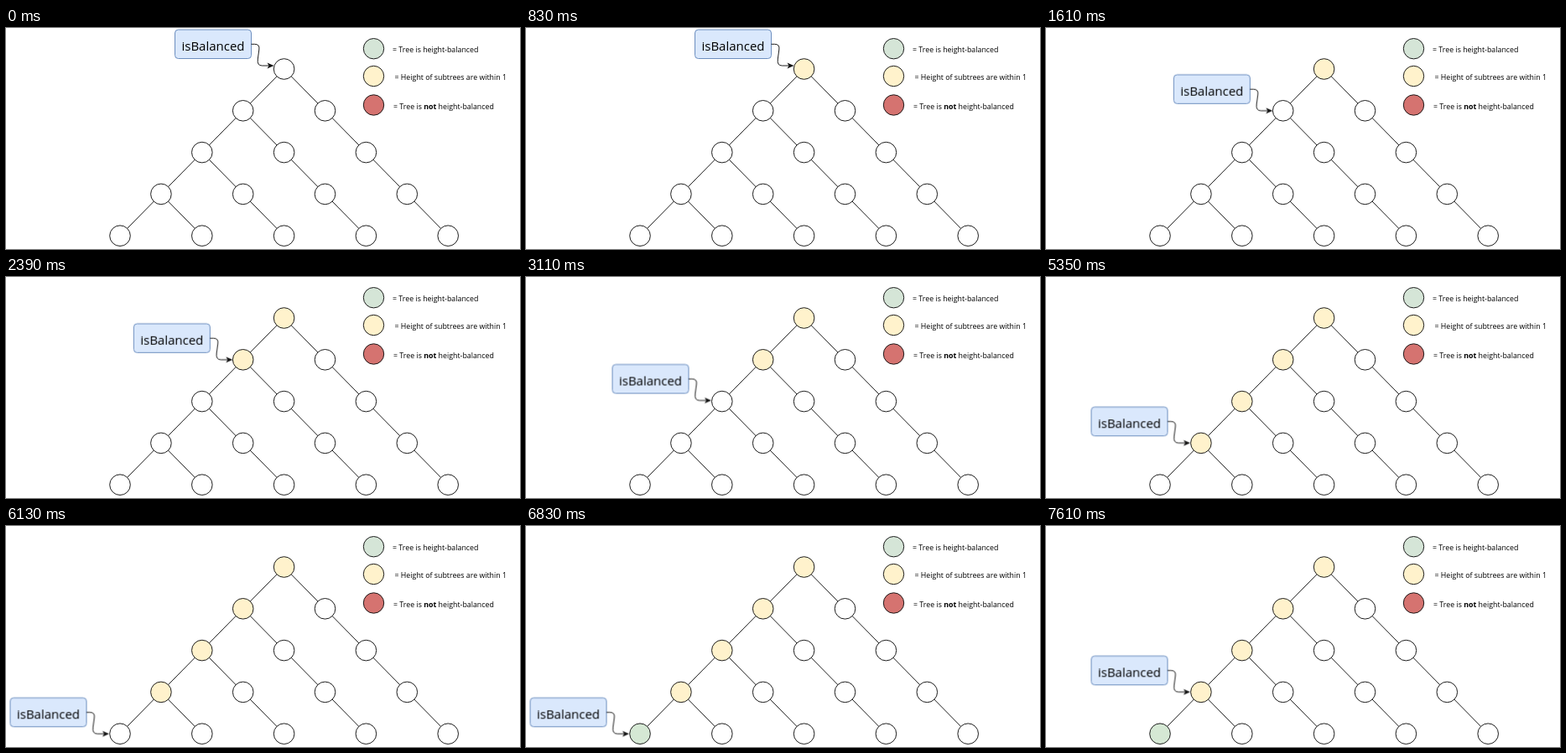
Animation, 613 px wide and 264 px high, one loop 8000 ms. Source, as an HTML page:

```html
<!DOCTYPE html>
<html lang="en">
<head>
<meta charset="utf-8">
<title>Balanced tree check</title>
<style>
  html, body { margin: 0; width: 100%; height: 100%; overflow: hidden; background: #fff; }
  svg { display: block; width: 613px; height: 264px; }
  text { font-family: "Open Sans", "Noto Sans", sans-serif; fill: #000; }
  circle, line, .arrow { stroke: #111; stroke-width: 0.95; }
  circle { fill: #fff; }
  .legend text { font-size: 8.83px; }
  .legend .bold { font-weight: 700; }
  .call { animation: walk 8s step-end infinite; }
  .call rect { fill: #dae8fc; stroke: #6c8ebf; }
  .call text { font-size: 15px; text-anchor: middle; }
  .arrow { fill: none; }
  .visit0 { animation: visit0 8s step-end infinite; }
  .visit1 { animation: visit1 8s step-end infinite; }
  .visit2 { animation: visit2 8s step-end infinite; }
  .visit3 { animation: visit3 8s step-end infinite; }
  .visit4 { animation: visit4 8s step-end infinite; }
  @keyframes walk {
    0%      { transform: translate(201.5px, 2px); }
    20.125% { transform: translate(152.3px, 55.8px); }
    38.875% { transform: translate(103px, 104.5px); }
    57.125% { transform: translate(54px, 155.3px); }
    76.625% { transform: translate(5px, 205.3px); }
    95.125%, 100% { transform: translate(54px, 155.3px); }
  }
  @keyframes visit0 { 0% { fill: #fff; } 10.375%, 100% { fill: #fff2cc; } }
  @keyframes visit1 { 0% { fill: #fff; } 29.875%, 100% { fill: #fff2cc; } }
  @keyframes visit2 { 0% { fill: #fff; } 48.375%, 100% { fill: #fff2cc; } }
  @keyframes visit3 { 0% { fill: #fff; } 66.875%, 100% { fill: #fff2cc; } }
  @keyframes visit4 { 0% { fill: #fff; } 85.375%, 100% { fill: #d5e8d4; } }
</style>
</head>
<body>
<svg viewBox="0 0 613 264">
  <g id="edges"></g>
  <g id="nodes"></g>
  <g class="legend">
    <circle cx="438.5" cy="24.7" r="12.2" style="fill:#d5e5d7"/>
    <circle cx="438.5" cy="57.5" r="12.2" style="fill:#fff2cc"/>
    <circle cx="438.5" cy="92" r="12.2" style="fill:#d57370"/>
    <text x="461" y="29">= Tree is height-balanced</text>
    <text x="463.5" y="62">= Height of subtrees are within 1</text>
    <text x="462" y="97">= Tree is <tspan class="bold">not</tspan> height-balanced</text>
  </g>
  <g class="call">
    <rect width="91" height="34.5" rx="4"/>
    <text x="45.5" y="25">isBalanced</text>
    <path class="arrow" d="M91 17.3 H95 Q101.5 17.3 100.3 24 L98.8 35 Q97.7 43 104 43 H112"/>
    <path d="M118 43 L110 46.4 L112 43 L110 39.6 Z" fill="#111"/>
  </g>
</svg>
<script>
  const ROWS = 5, RADIUS = 12.3;
  const edges = document.getElementById('edges');
  const nodes = document.getElementById('nodes');

  function add(parent, tag, attrs) {
    const el = document.createElementNS('http://www.w3.org/2000/svg', tag);
    for (const name in attrs) el.setAttribute(name, attrs[name]);
    parent.append(el);
  }

  function position(row, col) {
    return { x: 331.6 + (2 * col - row) * 48.9, y: 49 + row * 49.8 };
  }

  function connect(a, b) {
    add(edges, 'line', { x1: a.x, y1: a.y, x2: b.x, y2: b.y });
  }

  for (let row = 0; row < ROWS; row++) {
    for (let col = 0; col <= row; col++) {
      const p = position(row, col);
      add(nodes, 'circle', { cx: p.x, cy: p.y, r: RADIUS, class: col ? '' : 'visit' + row });
      if (row === ROWS - 1) continue;
      connect(p, position(row + 1, col + 1));
      // Only the leftmost path has left children.
      if (col === 0) connect(p, position(row + 1, 0));
    }
  }
</script>
</body>
</html>
```
